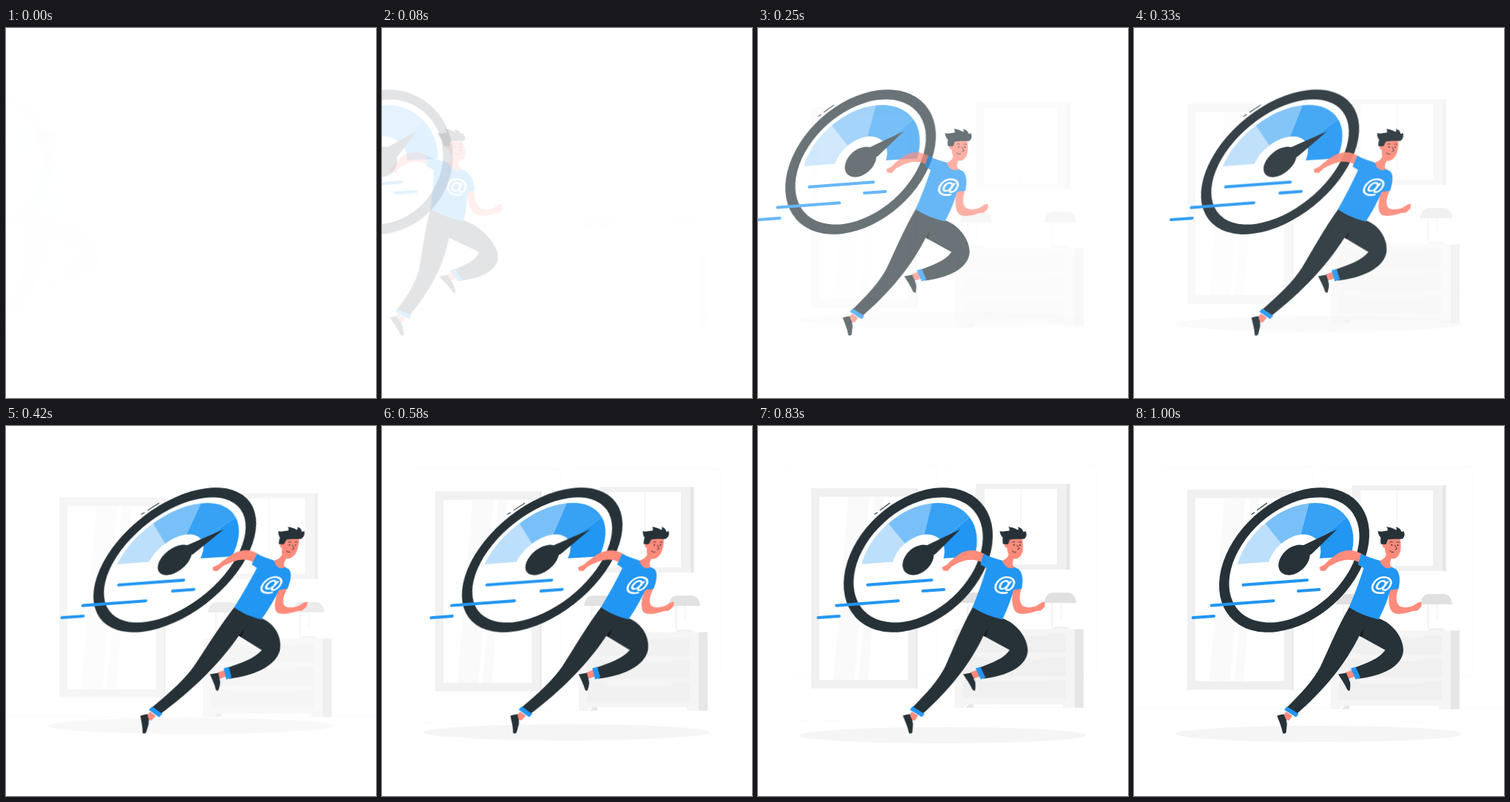
An HTML page for the animation above (1.04 s loop, 500 px wide and 500 px high).

```html
<!DOCTYPE html>
<html lang="en">
<head>
<meta charset="utf-8">
<title>Speed test</title>
<style>
  html, body { margin: 0; width: 100%; height: 100%; overflow: hidden; background: #fff; }
  svg { display: block; width: 100%; height: 100%; }
  #gauge, #runner, #room, #shadow { transform-box: view-box; }
  #gauge { transform-origin: 216.5px 181px; }
  #runner { transform-origin: 291px 276px; }
  .ink { fill: #263238; }
  .blue { fill: #2196f3; }
  .skin { fill: #ff8b7b; }
  .line { fill: none; stroke: #263238; stroke-linecap: round; }
  .hair { fill: none; stroke: #ebebeb; stroke-width: .25; }
  .streak { fill: none; stroke: #2196f3; stroke-width: 4; stroke-linecap: round; }
</style>
</head>
<body>
<svg viewBox="0 0 500 500">
  <defs>
    <g id="lamp">
      <path d="M-11 14V46" stroke="#f0f0f0" stroke-width="2"/>
      <path d="M1 14V35" stroke="#f0f0f0"/>
      <path d="M-12 49.5Q-11 46 -5 46H6Q11 46 12 49.5Z" fill="#f0f0f0"/>
      <path d="M-21.5 14C-21 6 -17 0 -9 0H9C17 0 21 6 21.5 14Z" fill="#e0e0e0"/>
    </g>
    <g id="drawer">
      <rect width="139" height="25" fill="#f0f0f0"/>
      <path d="M24 0H116L112 3H28Z" fill="#f5f5f5"/>
    </g>
  </defs>

  <g id="room">
    <path class="hair" d="M0 382.4H500M54 399.5H72M85 399.5H112M316 389H330M360 400H394M396 391H446"/>
    <rect class="hair" x="39" y="55.3" width="203" height="282" rx="5"/>
    <rect class="hair" x="255" y="55.3" width="202.500" height="282" rx="5"/>

    <rect x="213" y="86" width="2.500" height="270.500" fill="#e6e6e6"/>
    <rect x="72" y="86" width="141.500" height="270.500" fill="#f0f0f0"/>
    <rect x="83" y="97.500" width="119.500" height="247.500" fill="#fff"/>
    <path d="M122 97.500H150L130 345H102ZM157 97.500H169L148 345H136Z" fill="#fafafa"/>

    <rect x="416" y="80" width="5.500" height="116" fill="#e6e6e6"/>
    <rect x="294.500" y="80" width="122.500" height="116" fill="#f0f0f0"/>
    <rect x="306" y="87" width="98" height="102" fill="#fff"/>
    <path d="M355 87V189" stroke="#f0f0f0"/>

    <rect x="428" y="276.500" width="12" height="106" fill="#e6e6e6"/>
    <rect x="266" y="276.500" width="162" height="106" fill="#f5f5f5"/>
    <path d="M278 382.500L283 378H412V382.500Z" fill="#fff"/>
    <path d="M281 382.500L285 378H291V382.500Z" fill="#e6e6e6"/>
    <use href="#drawer" x="277" y="283"/>
    <use href="#drawer" x="277" y="314.500"/>
    <use href="#drawer" x="277" y="345"/>
    <use href="#lamp" x="294.500" y="227"/>
    <use href="#lamp" x="408.500" y="227"/>
  </g>

  <ellipse id="shadow" cx="249.700" cy="416" rx="193.600" ry="11" fill="#f5f5f5"/>

  <g id="gauge">
    <g id="dial"></g>
    <path class="ink" d="M227 162L274.500 139.500L240 173L222 182Z"/>
    <path class="streak" d="M147.500 214.800L234 208.300M104.700 242.600L188.500 236.300M79.700 259L108 257M222 223L250.500 220.900"/>
    <path class="line" stroke-width="1.100" d="M159 119.300L162.500 117M166.500 113.800L179.500 104.300"/>
  </g>

  <g id="runner">
    <!-- far shoe, ankle -->
    <path class="skin" d="M286 333L295 329.500L299 338.500L290 341.500Z"/>
    <path class="ink" d="M276 335.500L287 333.500C288 338 291 341 292 346C292.500 350 292.500 354 291.500 357.500Q289.500 358.500 288 356C285 349 280 342 276 335.500Z"/>
    <path d="M290 341.500L293.500 343L292.500 347Z" fill="#d3eafd"/>
    <!-- front shoe, ankle -->
    <path class="skin" d="M205.500 386L214 391.500L209.500 398L203 396.500L202 391Z"/>
    <path class="ink" d="M193.300 391.500Q199 389.500 203 389.500C203 394 207 397 207 401L205.500 414.500Q203.500 416.500 201 415C199.500 406 196 399 193.300 391.500Z"/>
    <path d="M205.500 397.500L208.500 400.500L207 404Z" fill="#d3eafd"/>
    <!-- trousers -->
    <path class="ink" d="M291 244.500L331 260C350 267 364 286 364 303C363 325 335 338 303 341.500L297 327C315 320 331 315 339.500 302.800L304.500 283.500C286 321 258 356 219 390L206.500 380.500C227 360 242 344 252 325C264 299 277 268 291 244.500Z"/>
    <path d="M304.500 283.500L311 273L308 285.500Z" fill="#000" opacity=".5"/>
    <path class="blue" d="M293 327.500L299.500 325.500L306 340L299.500 342.500Z"/>
    <path class="blue" d="M206.500 379L222.500 389L219 393.500L203 383.500Z"/>
    <!-- arms -->
    <path class="skin" d="M309 173.500C298 166.500 286 166 275 172.500C269 176.500 265 180.500 261 183.500L258 187L250.500 191L252 195.500L258 196L264 189.500C276 183 288 176.500 304 184Z"/>
    <path class="skin" d="M346.500 218C343 232 343.500 247 350 252C357 256 368 253 377 250L383 249.500L388.300 244V237.500L384 238.500L377 243C370 246 361 246 357.500 242C353 236 354.500 227 358 217Z"/>
    <!-- shirt -->
    <path class="blue" d="M307 172.500C315 177 323 179 331 181.500L348 190.500L354 193.500C359.500 198 360 209 357.500 220L346.500 221.500C342 237 336.500 250 330.500 261.500C316 258 303 253 290.500 245C298 228 305 209 310.500 192L302.500 187Z"/>
    <path class="skin" d="M341 170C341.500 176 338 180 332 181.700C334 189 342 195 348 191C345 187 346 184 348 178Z"/>
    <text transform="translate(334.500 215.300) rotate(12) skewX(-12)" y="7.500" text-anchor="middle"
      font-family="Liberation Sans, Arial, sans-serif" font-size="28.500" font-weight="700"
      fill="#fff" stroke="#fff" stroke-width=".5">@</text>
    <!-- head -->
    <path class="skin" d="M340 151H359C360.500 155 360.700 160 360.500 165C360 174 355 179.500 349.500 179.500C343.500 179.500 339 173 339 165C334 163 334 157 339 157Z"/>
    <path class="ink" d="M329.500 142C334 143.500 338 141.500 342.500 141.500Q343.500 138.500 341 136.500C347 136.500 351 139 354.500 140.500Q356 138.500 354 136.300C358.500 137.500 360.500 140 361.500 143Q364 143 364 141.500C366.500 145.500 366 150 362.500 152.500C356 153 350 152 343 153.500C341.500 156 342 159 339.500 160L333.500 159.500C333 156 333 153 333.500 151C331.500 149 330 146 329.500 142Z"/>
    <path class="line" stroke-width=".9" d="M346 157Q348 155.300 349.500 157M355 157Q357 155.500 358.500 157.500M352.500 161L355.500 166L353 167M345.500 168.500Q347.500 171.500 351 170.500"/>
    <circle class="ink" cx="348.300" cy="160.800" r="1"/>
    <circle class="ink" cx="356.500" cy="161" r="1"/>
  </g>
</svg>

<script>
const LOOP = 1040;
const STEP = 125 / 3;
const LEAD = 33;
const byId = id => document.getElementById(id);

// Dial: every round part is an ellipse with the same centre and tilt.
const CX = 216.5, CY = 181, TILT = -42;
const FACE = [91.4, 63];
const tiltCos = Math.cos(TILT * Math.PI / 180);
const tiltSin = Math.sin(TILT * Math.PI / 180);

function disc(rx, ry, fill) {
  return `<ellipse rx="${rx}" ry="${ry}" fill="${fill}" transform="translate(${CX} ${CY}) rotate(${TILT})"/>`;
}

function rimPoint([dx, dy]) {
  const u = dx * tiltCos + dy * tiltSin;
  const v = dy * tiltCos - dx * tiltSin;
  const s = 1 / Math.hypot(u / FACE[0], v / FACE[1]);
  return `${CX + dx * s} ${CY + dy * s}`;
}

function sector(from, to, fill) {
  return `<path fill="${fill}" d="M${CX} ${CY}L${rimPoint(from)}A${FACE} ${TILT} 0 1 ${rimPoint(to)}Z"/>`;
}

const edges = [[-79, 6], [-40, -50], [20, -77], [70, -57], [81, -5]];
const tints = ['#bcdffb', '#7ac0f8', '#37a1f4', '#2196f3'];
byId('dial').innerHTML =
  disc(116, 80, '#263238') +
  disc(101.5, 67.8, '#fff') +
  tints.map((tint, i) => sector(edges[i], edges[i + 1], tint)).join('') +
  disc(41, 28.2, '#fff') +
  disc(24.3, 16.8, '#263238');

// Motion: the easing applies to each keyframe interval.
const easing = 'cubic-bezier(.36, -.01, .5, 1.38)';
const rushIn = [
  { offset: 0, opacity: 0, transform: 'translate3d(-250px, 0, 0) skewX(20deg)', easing },
  { offset: .6, opacity: 1, transform: 'skewX(-10deg)', easing },
  { offset: .8, opacity: 1, transform: 'skewX(2deg)', easing },
  { offset: 1, opacity: 1, transform: 'translate3d(0, 0, 0)' }
];
const slideFrom = y => [
  { opacity: 0, transform: `translateY(${y}px)`, easing },
  { opacity: 1, transform: 'translateY(0px)' }
];

const moves = [
  ['gauge', rushIn],
  ['runner', rushIn],
  ['room', slideFrom(30)],
  ['shadow', slideFrom(-30)]
].map(([id, frames]) => {
  const move = byId(id).animate(frames, { duration: 1000, fill: 'both' });
  move.pause();
  return move;
});

const start = performance.now();

function draw() {
  const t = (performance.now() - start) % LOOP;
  // 24 pictures a second, held on a 10 ms grid
  const tick = Math.floor((Math.floor(t / 10) * 10 + 4.99) / STEP);
  const time = Math.min(1000, tick * STEP + LEAD);
  for (const move of moves) move.currentTime = time;
  requestAnimationFrame(draw);
}
draw();
</script>
</body>
</html>
```
